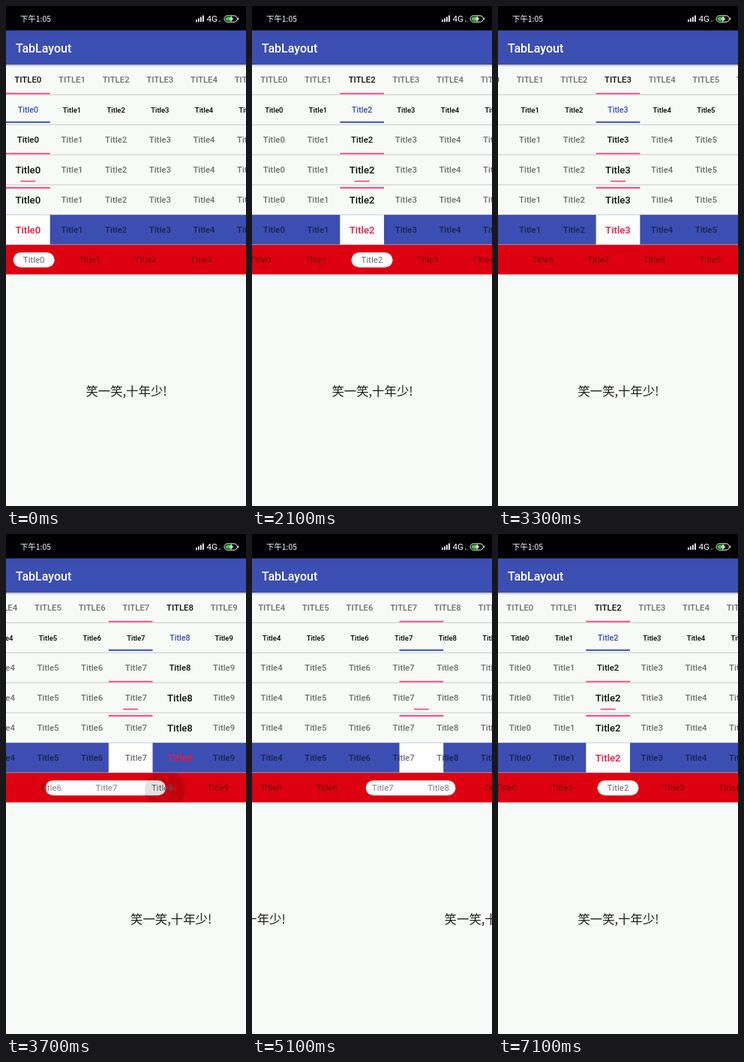
Write an HTML page that moves like this. It is 320x666 px and loops after 9900 ms.

```html
<!DOCTYPE html>
<html lang="zh">
<head>
<meta charset="utf-8">
<title>TabLayout</title>
<style>
  html, body { margin: 0; width: 100%; height: 100%; overflow: hidden; background: #f8faf7; }
  svg { display: block; width: 100%; height: 100%; font-family: Roboto, sans-serif; }
  .cjk { font-family: "Noto Sans CJK SC", "Noto Sans CJK", sans-serif; }
  .mid { text-anchor: middle; }
</style>
</head>
<body>
<svg id="stage" viewBox="0 0 320 666">
  <defs>
    <linearGradient id="shade" x2="0" y2="1">
      <stop stop-color="#000" stop-opacity=".28"/>
      <stop offset="1" stop-color="#000" stop-opacity="0"/>
    </linearGradient>
    <clipPath id="tabClip"><rect id="tabBox" y="318" width="74.4" height="39.5"/></clipPath>
  </defs>
  <rect width="320" height="666" fill="#f8faf7"/>
  <g id="pages" class="cjk mid" font-size="16.4" fill="#1c1c1c">
    <text x="160.5" y="519">笑一笑,十年少!</text>
    <text x="480.5" y="519">笑一笑,十年少!</text>
  </g>
  <g id="rows"></g>
  <circle id="ripple" fill="#000" clip-path="url(#tabClip)"/>
  <rect y="78" width="320" height="3" fill="url(#shade)"/>
  <rect y="32" width="320" height="46" fill="#3b4eb1"/>
  <text x="13" y="62.3" font-size="16" font-weight="500" fill="#fff">TabLayout</text>
  <rect width="320" height="32.5" fill="#000"/>
  <g fill="#fff">
    <text class="cjk" x="19" y="21" font-size="10.4">下午1:05</text>
    <path d="M253 18h1.8v3h-1.8zM256 16.4h1.8V21H256zM259 14.4h1.8V21H259zM262 12.4h1.8V21H262z"/>
    <text x="267.5" y="21.2" font-size="11.6">4G</text>
    <path d="M284 19.5h1v1.5h-1zM285.6 19.5h1v1.5h-1z" opacity=".6"/>
    <rect x="291" y="12.9" width="17.4" height="8.4" rx="4.2" fill="none" stroke="#fff"/>
    <rect x="292.6" y="14.4" width="10" height="5.4" rx="2.7" fill="#3fc34a"/>
    <path d="M309.3 15.6h1v3h-1zM301.4 12.6l-4 5.2h2.7l-1.3 4 4.2-5.4h-2.8z"/>
  </g>
</svg>
<script>
const NS = 'http://www.w3.org/2000/svg';
const LOOP = 9900, STEP = 100, COUNT = 10, WIDTH = 320;
const PINK = '#ff4081', BLUE = '#3b4eb1', GREY = '#707170', DARK = '#111';

const $ = id => document.getElementById(id);
const clamp = (v, lo, hi) => Math.min(hi, Math.max(lo, v));
const lerp = (a, b, f) => a + (b - a) * f;
const span = (t, start, length) => clamp((t - start) / length, 0, 1);

function set(node, attrs) {
  for (const key in attrs) node.setAttribute(key, attrs[key]);
  return node;
}
function add(parent, tag, attrs) {
  return parent.appendChild(set(document.createElementNS(NS, tag), attrs));
}

const decel = u => 1 - (1 - u) ** 2;
const settle = u => 1 - (1 - u) ** 5;
const flick = u => 1 - (1 - u ** 1.5) ** 3;

// cubic-bezier(.4, 0, .2, 1)
function standard(x) {
  let lo = 0, hi = 1, s = .5;
  for (let i = 0; i < 24; i++) {
    s = (lo + hi) / 2;
    const at = 1.2 * (1 - s) ** 2 * s + .6 * (1 - s) * s * s + s ** 3;
    if (at < x) lo = s; else hi = s;
  }
  return s * s * (3 - 2 * s);
}

// y, h: indicator top and height; w: its width; size, big: plain and selected text
const base = { pitch: 58.67, w: 58.67, h: 2, size: 11.4, big: 11.4, weight: 500, ink: GREY, on: DARK, bar: PINK };
const rows = [
  { caps: true, y: 37.5 },
  { y: 35.5, size: 9.5, big: 10.7, ink: '#000', on: BLUE, bar: BLUE },
  { y: 37.5 },
  { y: 34.4, h: 1.6, w: 20, big: 13.2 },
  { y: 3, big: 13.2 },
  { y: 0, h: 40, big: 13.2, bg: BLUE, bar: '#fff', ink: 'rgba(0,0,0,.56)', on: '#ea1a3e' },
  { y: 10, h: 20, w: 55, pitch: 74.4, weight: 400, size: 11.5, big: 11.5, pill: true,
    bg: '#dd0010', bar: '#fff', ink: 'rgba(0,0,0,.5)', on: '#666' }
].map((row, i) => ({ ...base, ...row, top: 78.2 + 40 * i }));

for (const row of rows) {
  const g = add($('rows'), 'g', { transform: `translate(0 ${row.top})` });
  if (row.bg) add(g, 'rect', { width: WIDTH, height: row.pill ? 39.3 : 40, fill: row.bg });
  row.strip = add(g, 'g', { class: 'mid', 'font-weight': row.weight });
  row.mark = add(row.strip, 'rect', { y: row.y, height: row.h, fill: row.bar, rx: row.pill ? 10 : 0 });
  row.labels = Array.from({ length: COUNT }, (_, i) => {
    const label = add(row.strip, 'text', { x: center(row, i) });
    label.textContent = (row.caps ? 'TITLE' : 'Title') + i;
    return label;
  });
  if (!row.pill) add(g, 'rect', { y: 39.4, width: WIDTH, height: 1, fill: '#c9cbc9' });
}

function center(row, i) { return (i + .5) * row.pitch; }
function rawScroll(row, i) { return center(row, i) - WIDTH / 2; }
function bound(row, x) { return clamp(x, 0, COUNT * row.pitch - WIDTH); }

const moves = [
  { at: 750, from: 0, to: 1 },
  { at: 1500, from: 1, to: 2 },
  { at: 2150, from: 2, to: 3 },
  { at: 3550, from: 3, to: 8, tap: true, slide: 600 },
  { at: 5050, from: 8, to: 1, tap: true, slide: 600 },
  { at: 6050, from: 1, to: 2, tap: true, slide: 300 }
];

const taps = [
  { at: 3500, tab: 8, x: 214, y: 342 },
  { at: 5000, tab: 1, x: 116, y: 344 },
  { at: 6000, tab: 2, x: 197, y: 352 }
];

function pose(t) {
  const move = moves.filter(m => m.at <= t).pop() || moves[0];
  const { at, from, to, tap, slide } = move;
  const f = tap ? standard(span(t, at, 300)) : flick(span(t, at, 440));
  const page = lerp(from, to, tap ? settle(span(t, at, slide)) : f);
  const selected = tap ? to : Math.round(page);
  return { from, to, tap, f, page, selected };
}

function scrollOf(row, p, t) {
  if (row.pill && t >= 2850 && t < 5050) {
    const end = bound(row, Infinity);
    return t < 4140
      ? lerp(rawScroll(row, 3), end, decel(span(t, 2850, 450)))
      : lerp(end, 0, decel(span(t, 4140, 660)));
  }
  const start = rawScroll(row, p.from);
  return bound(row, lerp(p.tap ? bound(row, start) : start, rawScroll(row, p.to), p.f));
}

function drawRow(row, p, t) {
  row.scroll = scrollOf(row, p, t);
  set(row.strip, { transform: `translate(${-row.scroll} 0)` });

  // the pill stretches: its leading edge runs ahead of the trailing one
  let fl = p.f, fr = p.f;
  if (row.pill) {
    const ahead = Math.sin(p.f * Math.PI / 2), behind = 1 - Math.cos(p.f * Math.PI / 2);
    [fl, fr] = p.to > p.from ? [behind, ahead] : [ahead, behind];
  }
  const a = center(row, p.from), b = center(row, p.to);
  const left = lerp(a, b, fl) - row.w / 2, right = lerp(a, b, fr) + row.w / 2;
  set(row.mark, { x: left, width: right - left });

  row.labels.forEach((label, i) => {
    const on = i === p.selected, size = on ? row.big : row.size;
    set(label, { 'font-size': size, fill: on ? row.on : row.ink, y: 20.2 + size * .356 });
  });
}

function drawRipple(t) {
  const tap = taps.find(k => t >= k.at && t < k.at + 600);
  set($('ripple'), { visibility: tap ? 'visible' : 'hidden' });
  if (!tap) return;
  const row = rows[6], u = (t - tap.at) / 600;
  const mid = center(row, tap.tab) - row.scroll;
  set($('tabBox'), { x: mid - row.pitch / 2 });
  set($('ripple'), {
    cx: lerp(tap.x, mid, u), cy: lerp(tap.y, 338, u),
    r: 7 + 60 * u, opacity: .17 * (1 - u)
  });
}

function draw(t) {
  const p = pose(t);
  set($('pages'), { transform: `translate(${-(p.page % 1) * WIDTH} 0)` });
  rows.forEach(row => drawRow(row, p, t));
  drawRipple(t);
}

const begun = performance.now();
function tick() {
  const t = (performance.now() - begun) % LOOP;
  draw(Math.floor(t / STEP) * STEP);
  requestAnimationFrame(tick);
}
tick();
</script>
</body>
</html>
```
